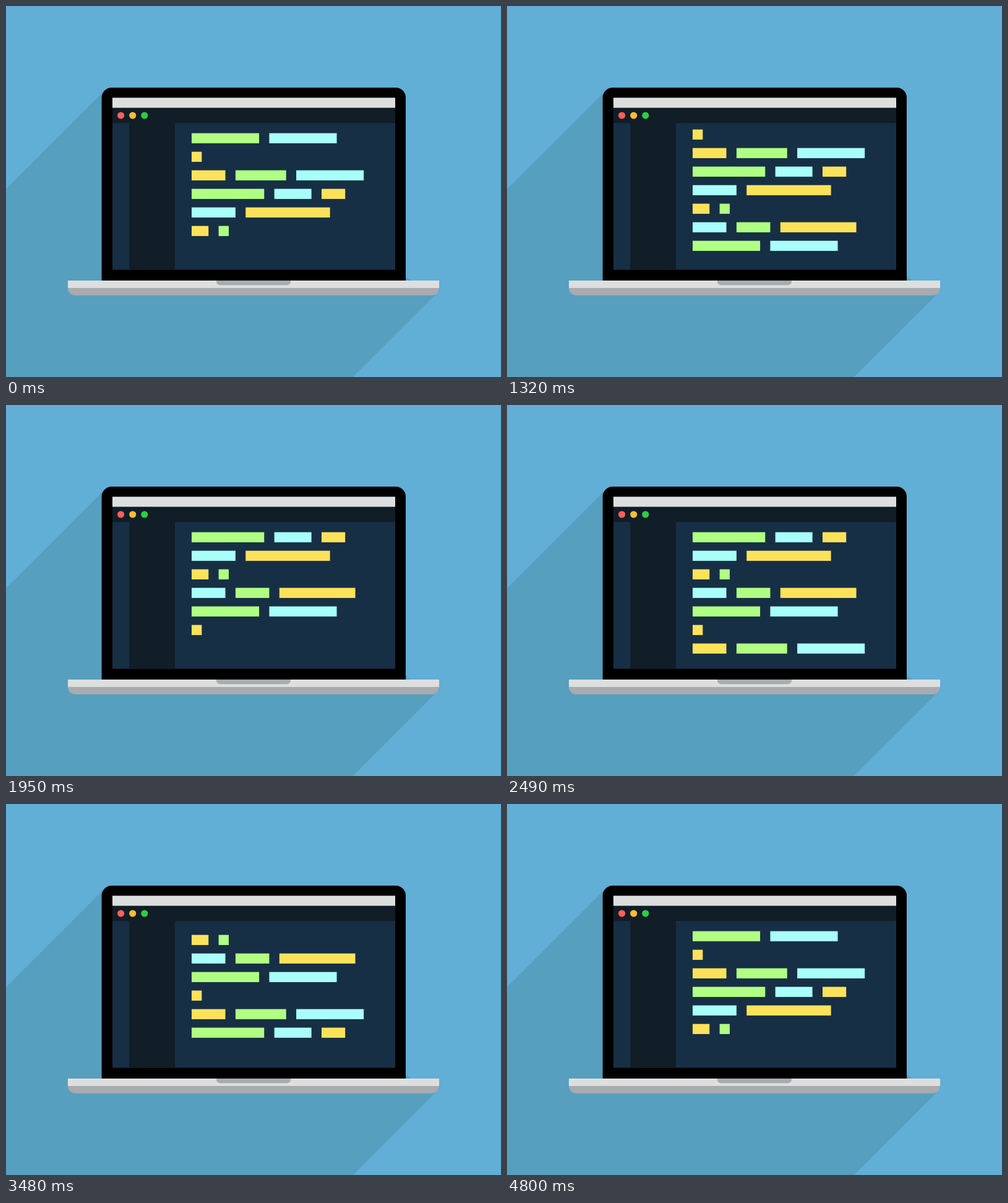
Animation of 800 by 600 pixels, one loop 4830 ms. Source, as an HTML page:

```html
<!DOCTYPE html>
<html lang="en">
<head>
<meta charset="utf-8">
<title>Typing laptop</title>
<style>
  html, body { margin: 0; width: 100%; height: 100%; overflow: hidden; background: #61aed6; }
  svg { display: block; width: 100%; height: 100%; }
</style>
</head>
<body>
<svg viewBox="0 0 800 600">
  <rect width="800" height="600" fill="#61aed6"/>
  <path d="M171 125.3L0 296.3V600H560.7L700 460.7V456H155V141ZM646 438L656 444H646Z" fill="#569fbf"/>
  <path d="M154.6 444V148a16 16 0 0 1 16-16H630a16 16 0 0 1 16 16V444Z"/>
  <rect x="172" y="148.4" width="457" height="278.2" fill="#172f45"/>
  <rect x="172" y="148.4" width="457" height="16.4" fill="#dddfde"/>
  <path d="M172 164.7H629V189.3H273V426.6H199.3V189.3H172Z" fill="#111d27"/>
  <circle cx="185.6" cy="177" r="5.6" fill="#ff5f57"/>
  <circle cx="204.7" cy="177" r="5.6" fill="#fdbc37"/>
  <circle cx="223.8" cy="177" r="5.6" fill="#2dcc43"/>
  <path d="M100 456H700a12 12 0 0 1-12 12H112a12 12 0 0 1-12-12Z" fill="#a8abaf"/>
  <rect x="100" y="444" width="600" height="12" fill="#dddfde"/>
  <path d="M340 444H460V445.5a6 6 0 0 1-6 6H346a6 6 0 0 1-6-6Z" fill="#a8abaf"/>
  <g id="code"></g>
</svg>
<script>
const TICK = 30, LOOP = 161, PAUSE = 3, SCROLL = 5;
const UNIT = 30 / 11, LEFT = 300, TOP = 205.7, PITCH = 30, CARET = 2;
const COLORS = { g: '#b0ff82', c: '#a8fffa', y: '#fce25a' };

// Each token is a colour and a width in units; tokens are one indent apart.
const lines = ['c20 g20 y45', 'g40 c40', 'y6', 'y20 g30 c40', 'g43 c22 y14', 'c26 y50', 'y10 g6'];

// Lay the tokens out in space and time: type a line, hold, scroll, repeat.
let clock = 1;
const program = lines.map(text => {
  let x = LEFT, total = 0;
  const tokens = text.split(' ').map(word => {
    const units = +word.slice(1);
    const token = { x, width: units * UNIT, color: COLORS[word[0]], start: clock, span: units < 40 ? 2 : 5 };
    x += (units + 6) * UNIT;
    total += units;
    clock += token.span + PAUSE;
    return token;
  });
  if (total < 20) clock += 4;
  const scrollAt = clock;
  clock += SCROLL + PAUSE;
  return { tokens, scrollAt, end: clock };
});

const clamp = v => Math.max(0, Math.min(1, v));
const code = document.getElementById('code');

function drawLine(line, y, tick) {
  return line.tokens.map(({ x, width, color, start, span }) => {
    if (tick < start) return '';
    const w = CARET + (width - CARET) * clamp((tick - start) / span);
    return `<rect x="${x}" y="${y}" width="${w}" height="${6 * UNIT}" fill="${color}"/>`;
  }).join('');
}

function draw(tick) {
  const current = program.findIndex(line => tick < line.end);
  const scroll = clamp((tick - program[current].scrollAt) / SCROLL) * PITCH;
  let out = '';
  for (let row = 0; row < 7; row++) {
    if (row === 0 && scroll > 7) continue; // the top line drops out as it leaves
    const line = program[(current + 1 + row) % 7];
    out += drawLine(line, TOP + row * PITCH - scroll, row < 6 ? Infinity : tick);
  }
  code.innerHTML = out;
}

const began = performance.now();
let shown = -1;
function frame() {
  const tick = Math.floor((performance.now() - began) / TICK) % LOOP;
  if (tick !== shown) draw(shown = tick);
  requestAnimationFrame(frame);
}
frame();
</script>
</body>
</html>
```
